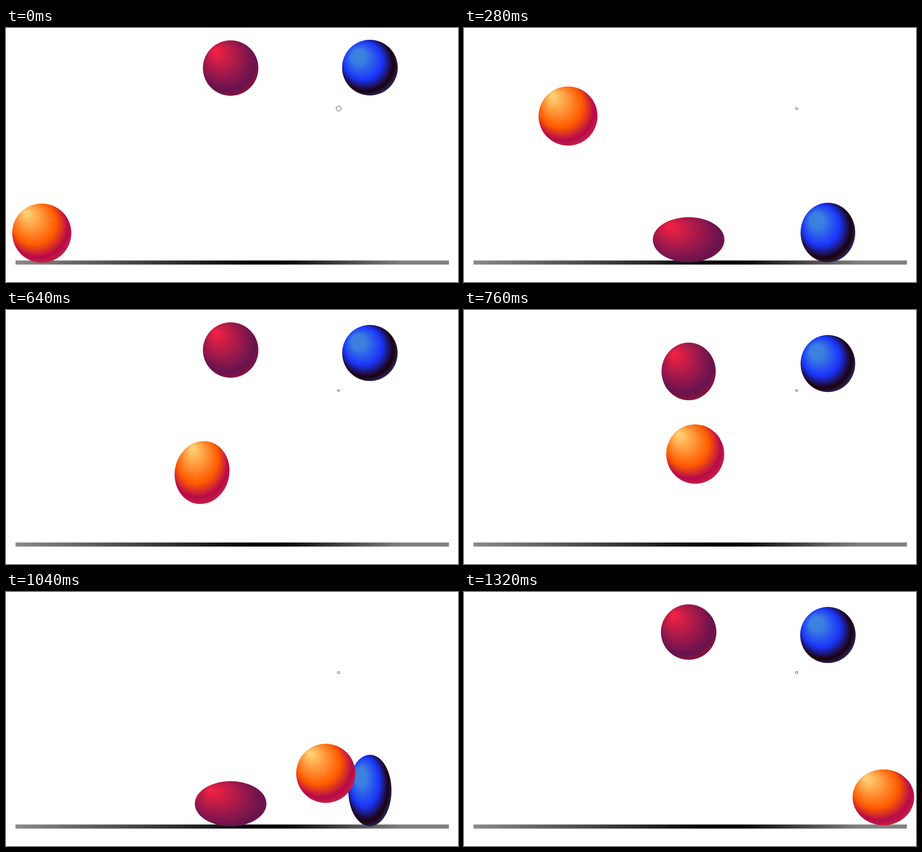
Write an HTML page with a canvas that moves like this. It is 998 px wide and 561 px high and loops after 1360 ms.

```html
<!DOCTYPE html>
<html lang="en">
<head>
<meta charset="utf-8">
<title>Bouncing balls</title>
<style>
html, body { margin: 0; width: 100%; height: 100%; overflow: hidden; background: #fff; }
canvas { display: block; width: 998px; height: 561px; }
</style>
</head>
<body>
<canvas id="stage" width="998" height="561"></canvas>
<script>
const ctx = document.getElementById('stage').getContext('2d');
const STEP = 40, LOOP = 34, BOUNCE = 17, GROUND = 517.5;
const FLAT = { w: 167, h: 83 };

const mix = (a, b, p) => a + (b - a) * p;

// Radial gradient in ball radii, with its bright spot off centre.
function shade(spot, centre, radius, stops) {
  const g = ctx.createRadialGradient(0, 0, 0, centre[0] - spot[0], centre[1] - spot[1], radius);
  for (const [o, c] of stops) g.addColorStop(o, c);
  return { spot, paint: g };
}

// Falls from top by drop until step land, lies squashed until lift, is up again at end.
const red = {
  x: 496, size: 122.5, top: 88.5, drop: 335, land: 5.33, lift: 10.67, end: 16,
  tall: d => .031 * d ** 1.3, slim: d => Math.min(8, .06 * d), follow: .3,
  ...shade([-.56, -.62], [-.07, -.16], 1.32,
    [[0, '#f02244'], [.06, '#ec2143'], [.8, '#67134f'], [1, '#9c152c']])
};
const blue = {
  x: 803.5, size: 123, top: 87.5, drop: 350, land: 6.74, lift: 9, end: 17.2,
  tall: d => .1 * d, slim: d => .079 * d, follow: 1,
  ...shade([-.5, -.49], [-.05, -.05], 1.25,
    [[0, '#3c82e0'], [.2, '#3b7fe0'], [.55, '#1a35fa'], [.8, '#1e0008'], [.92, '#263070']])
};
const orange = {
  size: 130.5, follow: 1,
  ...shade([-.55, -.72], [-.05, -.1], 1.3,
    [[0, '#ffd278'], [.06, '#ffce70'], [.58, '#ff5a00'], [.8, '#b60a4b'], [1, '#d8303a']])
};

// Touchdowns of the travelling ball; height is that of the hop before.
const touches = [
  { n: 0, x: 79, y: 453, squash: 0 },
  { n: 13.8, x: 376, y: 475.5, squash: 1, height: 270 },
  { n: 23, x: 614, y: 475.5, squash: 1, height: 160 },
  { n: 29, x: 798, y: 475.5, squash: 1, height: 75 },
  { n: 33, x: 926, y: 453.5, squash: .15, height: 35 }
];

function bounce(ball, n) {
  const { x, size, top, drop, land, lift, end } = ball;
  const p = Math.min(1, n < lift ? n / land : (end - n) / (end - lift));
  const d = drop * p * p;
  const w = size - ball.slim(d), h = size + ball.tall(d);
  if (p < 1) return { x, y: top + d, w, h, angle: 0 };
  const press = Math.sin(Math.PI * (n - land) / (lift - land));
  const low = mix(h, FLAT.h, press);
  return { x, y: GROUND - low / 2, w: mix(w, FLAT.w, press), h: low, angle: 0 };
}

function hop(ball, n) {
  const i = Math.max(1, touches.findIndex(t => t.n >= n));
  const a = touches[i - 1], b = touches[i], span = b.n - a.n;
  const q = (n - a.n) / span;
  const speed = 4 * b.height * (1 - 2 * q) / span;
  const near = Math.max(0, 1 - Math.min(n - a.n, b.n - n) / .9);
  const press = near * (q < .5 ? a : b).squash;
  const free = 1 - near;
  return {
    x: mix(a.x, b.x, q),
    y: mix(a.y, b.y, q) - 4 * b.height * q * (1 - q),
    w: mix(ball.size, FLAT.w, press) - .28 * Math.abs(speed) * free,
    h: mix(ball.size, FLAT.h, press) + .007 * speed * speed * free,
    angle: .17 * speed * i * free
  };
}

function drawBall(ball, { x, y, w, h, angle }) {
  ctx.save();
  ctx.translate(x, y);
  ctx.rotate(angle * Math.PI / 180);
  ctx.beginPath();
  ctx.ellipse(0, 0, w / 2, h / 2, 0, 0, 2 * Math.PI);
  ctx.translate(ball.spot[0] * w / 2, ball.spot[1] * h / 2);
  ctx.scale(w / 2, ball.size / 2 * (h / ball.size) ** ball.follow);
  ctx.fillStyle = ball.paint;
  ctx.fill();
  ctx.restore();
}

const bar = ctx.createLinearGradient(21, 0, 978, 0);
[[0, '#8a8a8a'], [.55, '#000'], [.61, '#000'], [.89, '#808080'], [1, '#808080']]
  .forEach(([o, c]) => bar.addColorStop(o, c));

function draw(n) {
  ctx.fillStyle = '#fff';
  ctx.fillRect(0, 0, 998, 561);
  ctx.fillStyle = bar;
  ctx.fillRect(21, 513.5, 957, 9);
  for (const ball of [red, blue]) drawBall(ball, bounce(ball, n % BOUNCE));
  drawBall(orange, hop(orange, n));
  ctx.beginPath();
  ctx.arc(734.5, 178, n ? 2.4 : 5.5, 0, 2 * Math.PI);
  ctx.lineWidth = 1;
  ctx.strokeStyle = '#333';
  ctx.stroke();
}

const start = performance.now();
function tick() {
  draw(Math.floor((performance.now() - start) / STEP) % LOOP);
  requestAnimationFrame(tick);
}
tick();
</script>
</body>
</html>
```
